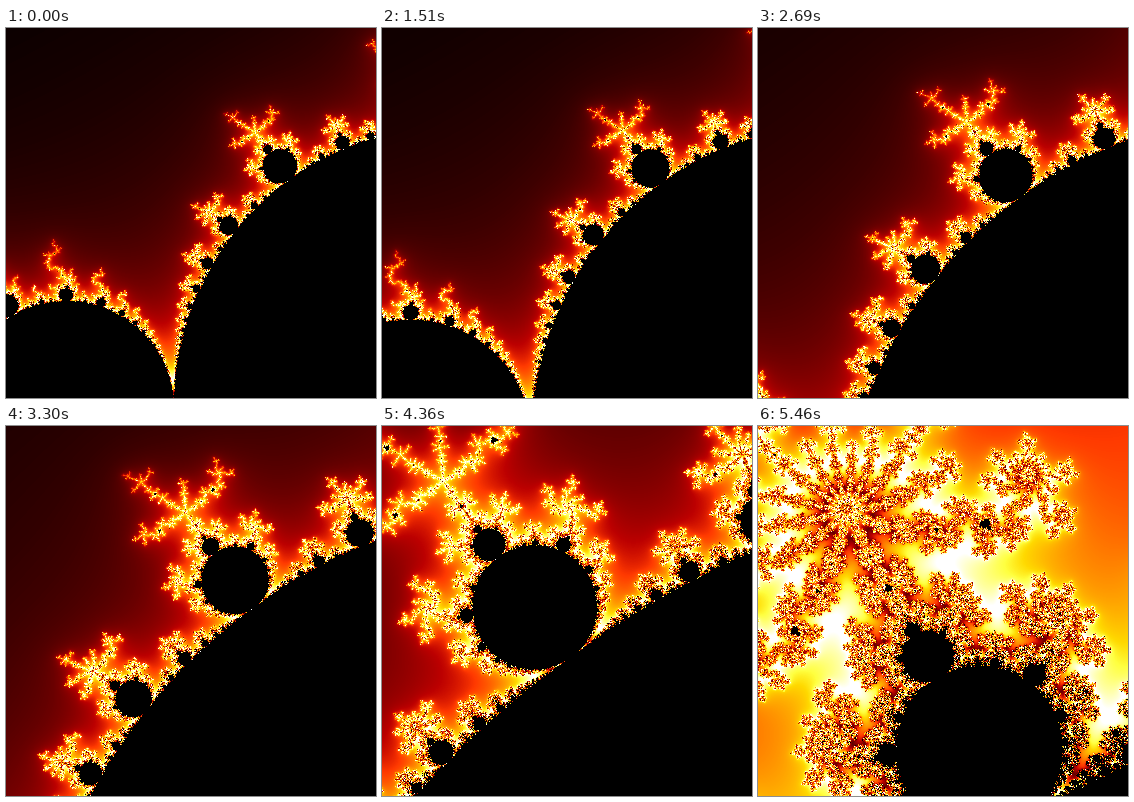
Animation, 370 px wide and 370 px high, one loop 5500 ms. Source, as an HTML page with a canvas:

```html
<!DOCTYPE html>
<html lang="en">
<head>
<meta charset="utf-8">
<title>Fractal zoom</title>
<style>
  html, body { margin: 0; width: 100%; height: 100%; overflow: hidden; background: #000; }
  canvas { display: block; width: 370px; height: 370px; }
</style>
</head>
<body>
<canvas id="view" width="370" height="370"></canvas>
<script>
const SIZE = 370, LOOP = 5500, FRAMES = 135, MAX_ITER = 400;
const ctx = document.getElementById('view').getContext('2d');
const image = ctx.createImageData(SIZE, SIZE);
const pixels = new Uint32Array(image.data.buffer);
const BLACK = 0xff000000;

// The zoom keeps this point of the plane at this place on the stage.
const focus = { re: -0.4, im: 0.6, x: 318.5, y: 122 };

// Width of the visible plane: a hold, then a steady linear zoom.
const widthAt = frame => Math.min(0.858, 0.0076 * (137.6 - frame));

// Heat colours rise black, red, yellow, white, then swing between white and dark red.
const SHADES = 10, PEAK = 45, LOW = 8;
const ramp = (v, from, to) => Math.round(255 * Math.min(1, Math.max(0, (v - from) / (to - from))));

function heat(v) {
  const swing = PEAK - LOW;
  if (v > PEAK) v = LOW + Math.abs(swing - (v - PEAK) % (2 * swing));
  const r = ramp(v, 1.5, 18.5), g = ramp(v, 14, 34), b = ramp(v, 31, 43);
  return (BLACK | b << 16 | g << 8 | r) >>> 0;
}
const palette = Uint32Array.from({ length: (MAX_ITER + 1) * SHADES }, (_, i) => heat(i / SHADES));

// Safe inner disc of the p/q bulb on the main cardioid.
function bulb(p, q) {
  const a = 2 * Math.PI * p / q;
  const nx = Math.cos(a) - Math.cos(2 * a), ny = Math.sin(a) - Math.sin(2 * a);
  const len = Math.hypot(nx, ny), r = Math.sin(Math.PI * p / q) / (q * q);
  return {
    re: Math.cos(a) / 2 - Math.cos(2 * a) / 4 + r * nx / len,
    im: Math.sin(a) / 2 - Math.sin(2 * a) / 4 + r * ny / len,
    r2: (0.95 * r) ** 2
  };
}
const discs = [bulb(2, 5), bulb(3, 7), bulb(3, 8), bulb(5, 13)];

function isInside(x, y) {
  const y2 = y * y, u = x - 0.25, q = u * u + y2;
  if (q * (q + u) <= y2 / 4 || (x + 1) * (x + 1) + y2 <= 0.0625) return true;
  for (const d of discs) {
    const dx = x - d.re, dy = y - d.im;
    if (dx * dx + dy * dy < d.r2) return true;
  }
  return false;
}

function shade(cx, cy) {
  if (isInside(cx, cy)) return BLACK;
  let x = 0, y = 0, x2 = 0, y2 = 0, n = 0;
  let oldX = 0, oldY = 0, mark = 32;
  while (x2 + y2 < 256) {
    if (n++ >= MAX_ITER) return BLACK;
    y = 2 * x * y + cy;
    x = x2 - y2 + cx;
    x2 = x * x;
    y2 = y * y;
    // An orbit that repeats never escapes.
    if (Math.abs(x - oldX) + Math.abs(y - oldY) < 1e-9) return BLACK;
    if (n === mark) {
      oldX = x;
      oldY = y;
      mark *= 2;
    }
  }
  const smooth = n - Math.log2(Math.log2(x2 + y2) / 2);
  return palette[Math.floor(Math.max(0, smooth) * SHADES)];
}

function draw(width) {
  const step = width / SIZE;
  for (let py = 0, i = 0; py < SIZE; py++) {
    const im = focus.im + (focus.y - py) * step;
    for (let px = 0; px < SIZE; px++) {
      pixels[i++] = shade(focus.re + (px - focus.x) * step, im);
    }
  }
  ctx.putImageData(image, 0, 0);
}

const start = performance.now();
let shown = 0;

function tick() {
  const t = (performance.now() - start) % LOOP;
  const frame = Math.min(FRAMES - 1, Math.floor((t + 0.5) * FRAMES / LOOP));
  const width = widthAt(frame);
  if (width !== shown) draw(shown = width);
  requestAnimationFrame(tick);
}
tick();
</script>
</body>
</html>
```
